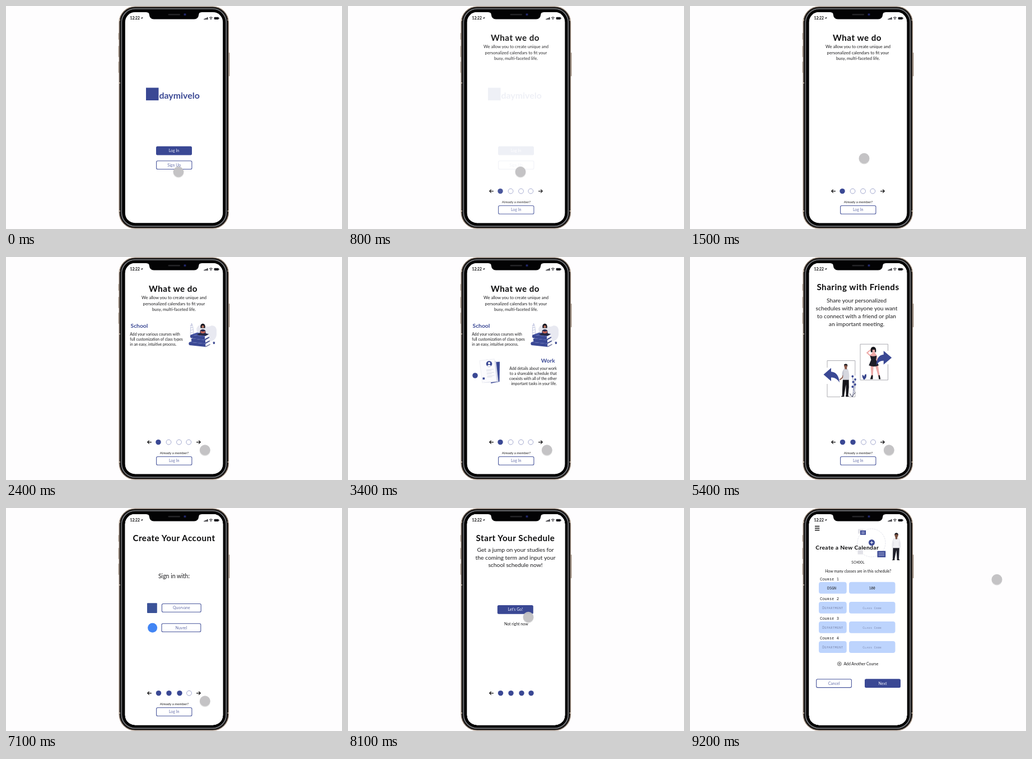
Animation of 600x397 px, one loop 9.3 s. Source, as an HTML page:

```html
<!DOCTYPE html>
<html lang="en">
<head>
<meta charset="utf-8">
<title>Calendar app onboarding</title>
<style>
html, body { margin: 0; width: 100%; height: 100%; overflow: hidden; background: #fefdfe; }
svg { display: block; width: 100vw; height: 100vh; }
text { font-family: Lato, "Open Sans", sans-serif; fill: #1c1c1e; }
.b { font-weight: 700; fill: #0b0b0c; }
.title { letter-spacing: .035em; }
.mono { font-family: "Noto Sans Mono", "DejaVu Sans Mono", monospace; }
.caps { font-variant: small-caps; }
</style>
</head>
<body>
<svg id="stage" viewBox="0 0 600 397" xmlns="http://www.w3.org/2000/svg"></svg>
<script>
const LOOP = 9300;
const BLUE = '#3a4894', INK = '#15151b', PALE = '#e8e9f1', FIELD = '#bdd4fd', SKIN = '#eeaaa8', BROWN = '#8b5a4c';

const text = (x, y, s, size, attr = '', anchor = 'middle') =>
  `<text x="${x}" y="${y}" font-size="${size}" text-anchor="${anchor}" ${attr}>${s}</text>`;
const lines = (x, y, step, list, size, anchor) =>
  list.map((s, i) => text(x, y + i * step, s, size, '', anchor)).join('');
const title = (s, x = 300, y = 58.5) => text(x, y, s, 15.1, 'class="b title"');
const label = (x, y, s, size, anchor) => text(x, y, s, size, `font-weight="700" style="fill:${BLUE}"`, anchor);
const rect = (x, y, w, h, fill, r = 0, attr = '') =>
  `<rect x="${x}" y="${y}" width="${w}" height="${h}" rx="${r}" fill="${fill}" ${attr}/>`;
const dot = (x, y, r, fill, attr = '') => `<circle cx="${x}" cy="${y}" r="${r}" fill="${fill}" ${attr}/>`;
const path = (d, fill, attr = '') => `<path d="${d}" fill="${fill}" ${attr}/>`;
const line = (d, color, w = 1, attr = '') => path(d, 'none', `stroke="${color}" stroke-width="${w}" ${attr}`);
const group = (id, body) => `<g id="${id}">${body}</g>`;

function button(x, y, w, s, solid) {
  const box = solid
    ? rect(x, y, w, 15.8, BLUE, 2.5)
    : rect(x + .6, y + .5, w - 1.2, 14.8, '#fff', 2.3, 'stroke="#4a579d" stroke-width="1.1"');
  return box + text(x + w / 2, y + 10.3, s, 7, `style="fill:${solid ? '#eef0fa' : '#6670aa'}"`);
}

function pager(count, xs = [272.5, 291, 310, 327], next = true) {
  const arrow = (x, d) => line(`M${x - 3.7 * d} 329.6H${x + 3.2 * d}M${x + .4 * d} 326.6L${x + 3.5 * d} 329.6L${x + .4 * d} 332.6`, '#101012', 1.3);
  return arrow(256.2, -1) + (next ? arrow(343.7, 1) : '') +
    xs.map((x, i) => i < count ? dot(x, 329.6, 4.7, BLUE)
      : dot(x, 329.6, 4.4, '#fff', 'stroke="#8890c0" stroke-width=".8"')).join('');
}

const member = () => text(300.5, 350.7, 'Already a member?', 6.1) + button(268, 355, 64.5, 'Log In');
const screen = (id, body) => group(id, rect(212, 10, 176, 377, '#fff') + body);

function phone() {
  const keys = [[200.7, 48, 12], [200.7, 71, 20], [200.7, 99, 20], [397.6, 83, 42]];
  return keys.map(([x, y, h]) => rect(x, y, 1.7, h, '#8d7d70', .7)).join('') +
    rect(201.4, .4, 196.8, 396.2, '#b3a091', 29) +
    rect(202.5, 1.4, 194.6, 394.2, '#39332f', 28) +
    rect(203.8, 2.5, 192, 392, '#0a0a0b', 26.8) +
    rect(206.4, 4.9, 186.8, 387.2, 'none', 24.2, 'stroke="#737477" stroke-width="1.9"') +
    rect(207.6, 6, 184.4, 385, '#020203', 23) +
    line('M201.4 25H204M395.5 25H398M201.4 137H204M395.5 365H398M201.4 365H204', '#d8cabc', 1.4);
}

function status() {
  return path('M251 10H349V11.2Q344.5 11.2 344.3 15Q343.4 23.6 336 23.6H264Q256.6 23.6 255.7 15Q255.5 11.2 251 11.2Z', '#030304') +
    rect(289.5, 14, 21.5, 2.4, '#242427', 1.2) + dot(319.5, 15.2, 2.4, '#15183f') + dot(319.5, 15.2, 1.1, '#2d348c') +
    text(221.6, 24, '12:22', 6.7, 'class="b"', 'start') +
    path('M240.8 21.5L244.6 19.6L242.8 23.6L242.4 21.9Z', INK) +
    [0, 1, 2, 3].map(i => rect(353.4 + i * 1.9, 22.7 - i * .9, 1.4, 1.5 + i * .9, INK, .3)).join('') +
    line('M363 20.8Q365.9 18.5 368.8 20.8M364.2 22.3Q365.9 21 367.6 22.3', INK, 1) + dot(365.9, 23.6, .8, INK) +
    rect(371.6, 19.7, 8.2, 4.2, INK, 1.1) + rect(380.2, 20.9, .8, 1.8, INK, .3);
}

function reader() {
  const book = (x, y, w) =>
    path(`M${x} ${y}L${x + 11} ${y - 4}L${x + w} ${y - 1.5}L${x + w - 8} ${y + 3}Z`, '#4453a3') +
    path(`M${x} ${y}L${x + w - 8} ${y + 3}V${y + 8.5}L${x} ${y + 5.5}Q${x - 2.5} ${y + 2.5} ${x} ${y}Z`, BLUE) +
    path(`M${x + w - 8} ${y + 3}L${x + w} ${y - 1.5}V${y + 3.5}L${x + w - 8} ${y + 7.7}Z`, '#f2f2f7') +
    line(`M${x + w - 8} ${y + 8.3}L${x + w} ${y + 4}`, '#29336f', 1);
  const rungs = [0, 1, 2, 3, 4, 5, 6].map(i => `M${328.6 + i * .4} ${122 + i * 4.2}l4.6 -.8`).join('');
  return path('M340 128Q344 118 354 122Q361 126 367 122Q377 122 376 134Q377 147 366 150Q352 154 344 146Z', PALE) +
    line('M333.5 152Q326 138 331.5 118Q337 130 333.5 152', '#9aa1cb', .6) + line(rungs, '#a9afd4', .7) +
    book(327.5, 151.5, 37) + book(332, 145, 32) + book(330, 138.5, 33) +
    path('M346 137L346.8 130.5Q351.5 127 356 130.5L357 137Z', '#262a50') +
    path('M347.4 126.5Q346.4 119 351.4 118.5Q356.5 119 355.6 126.5Z', '#17171f') + dot(351.5, 124, 2.2, '#b97463') +
    path('M347.5 131.5L351.5 132.8L355.7 131.5V135L351.5 136.3L347.5 135Z', '#c46458') +
    path('M341 137.5Q346.5 134.5 351 137Q356.5 134.5 361.5 137.8L357 140L345 139.5Z', '#242741') +
    path('M370.3 155Q368.8 151.5 370.5 150.3Q371.4 153 372.9 150.3Q373.6 153 372.4 155Z', '#3f4c93');
}

function resume() {
  return path('M261 187L271 186.6L270.5 222L255 225Z', BLUE) +
    path('M247 182.5L264.3 185L268.7 222L243 224Z', '#d4d7e8') +
    path('M235 184.6L261.3 181.6L265.6 221L239.8 224Z', '#fbfbfd', 'stroke="#e3e4ed" stroke-width=".6"') +
    dot(252, 190.3, 5.3, BLUE) + dot(252, 189, 2, '#fff') + path('M248.4 194Q252 190 255.6 194Q252 196.6 248.4 194Z', '#fff') +
    [0, 1, 2].map(i => line(`M${247 + i * .7} ${201 + i * 5.5}l13 -1.2M${247 + i * .7} ${203 + i * 5.5}l9 -.9`, '#cfd1df', .7)).join('') +
    rect(240.5, 214.5, 3.6, 3.6, BLUE) + dot(227, 211, 4.8, BLUE);
}

function sharing() {
  const frame = d => line(d, '#a3a3aa', .9);
  return frame('M245 197V184.5H294.8V211M245 226V249H268M284 249H294.8V238') +
    frame('M353.5 167V155.2H304V219H353.5V191') +
    // man
    path('M273 217H283.6Q284.6 232 282.4 246.5H278.6L278.4 227L275.2 246.5H271.8Q272 230 273 217Z', INK) +
    path('M269.8 248.7Q271 246 275.4 246V248.7ZM278.2 248.7V246H282L284 248.7Z', INK) +
    line('M273.5 209L272.5 214.5L267.3 218.7', BROWN, 2) +
    path('M274 200Q277.5 197.5 282 199.5Q285.3 208 283.8 218.7H273Z', '#d6d7df') +
    path('M274.5 200Q271.3 204 271.4 210.5L275 211.5Z', '#c5c7d2') +
    path('M276 194H280.5L280 200L276.3 199.4Z', BROWN) + dot(278, 194.2, 2.8, BROWN) +
    path('M275 193Q274.8 190.2 278.2 190.2Q281.8 190.3 281.2 194.5L279.5 192.4Z', INK) +
    path('M238.5 209.3L252 197.6V204.3Q265 204.5 267 223.5Q261 213.5 252 214.5V221Z', BLUE) +
    // flowers
    line('M290 249Q294 229 290 212M292 238L295.2 218M292 243Q296 233 294.6 227', '#4d5585', .6) +
    [[290.3, 212.5], [295, 218], [291.5, 222.5], [294.8, 227], [290.3, 231]].map(p => dot(...p, 1.9, BLUE)).join('') +
    line('M290 249Q286 246 285.5 243M290 249Q291 244 295.5 241.5', '#2c2f4c', 1) +
    // woman
    path('M322.3 191H328L326.5 213L324 214ZM330 191H335.5L339 213L336.7 214Z', SKIN) +
    path('M321.8 217.5L324 210.5H326.5V217.5ZM336.5 210.5H338.8L340.3 217.5H337.2Z', INK) +
    line('M322.3 176L316.3 170.5L323.5 164.5', SKIN, 2.1) + line('M333 176L334.5 187', SKIN, 2) +
    path('M325.8 165H330L329.8 170L333 174V177H322V174L325.6 171Z', SKIN) +
    path('M321.5 175.5Q327 178 333.3 175.5L332.3 183L337 193Q329 197 319.3 193L323.4 183Z', '#1d1d27') +
    path('M322.9 169.5Q321.3 160 327.4 159.8Q333.5 160.3 332.2 169.5L330.3 169.5L330 165H325.8V169.5Z', INK) +
    path('M360.2 179.2L345.7 167V173.8Q333.5 174.5 332.7 192.5Q338 183.7 345.7 184.8V191.4Z', BLUE) +
    path('M311 218.7Q306.5 214.5 308 209.5Q310 210.5 311 213Q312 208 314.5 208.5Q316.5 214.5 311 218.7Z', '#34428b');
}

function planner() {
  const card = (x, y, w, h) => rect(x, y, w, h, BLUE) +
    [.28, .5, .72].map(k => line(`M${x + 2} ${y + h * k}h${w - 4}`, '#c4cae9', .8)).join('');
  return dot(324, 62, 25, 'none', 'stroke="#dcdde6" stroke-width=".8" stroke-dasharray="3 1.2"') +
    rect(300, 37.5, 10, 8, '#e2e2e8') + card(304, 40, 10, 7.8) + rect(299.5, 75, 9.5, 7.5, '#e2e2e8') + card(334.5, 76.5, 14.7, 11.2) +
    dot(324.5, 61.5, 5.5, BLUE) + line('M321.7 61.5h5.6M324.5 58.7v5.6', '#fff', 1.1) +
    path('M362.5 69H374L373 91.5H369.7L368.5 75L365.2 91.5H362Z', '#20202a') +
    path('M360.5 93Q362 90.7 365.3 91V93ZM369.7 93V91H373L374.8 93Z', INK) +
    path('M364 54.5Q368.5 52.5 373 54.5Q376.5 61 375.5 70L373.5 71H363L361 70Q360.5 60 364 54.5Z', '#f0f0f4', 'stroke="#d3d3dc" stroke-width=".6"') +
    line('M363.7 60L363 68M373.3 60L373.7 68', '#cfcfd9', .6) + path('M366.4 49H370.6L370 55.4H367Z', '#78503f') +
    dot(368.6, 48.7, 3.1, '#78503f') + path('M365.3 48.5Q365 44.4 368.7 44.3Q372.2 44.5 371.9 48.5L370.5 46.8H367Z', INK);
}

function courses() {
  const grey = 'class="mono caps" style="fill:#7d8ab2"', dark = 'class="mono"';
  return [0, 1, 2, 3].map(i => {
    const y = 131.8 + i * 35.1;
    const hint = text(254.8, y + 12.6, 'Department', 6.2, grey) + text(325.2, y + 12.6, 'Class Code', 5.7, grey);
    return text(232, y - 2.8, 'Course ' + (i + 1), 7.1, 'class="mono caps"', 'start') +
      rect(230, y, 49.7, 20.8, FIELD, 4) + rect(284, y, 82.5, 20.8, FIELD, 4) +
      (i ? hint : group('hint', hint) + group('entry', text(253, y + 12.9, 'DSGN', 6.7, dark) + text(325.2, y + 12.9, '100', 6.2, dark)));
  }).join('');
}

const splash = screen('splash',
  rect(250, 145.5, 22.5, 22.5, BLUE) + label(273.5, 165.2, 'daymivelo', 15.9, 'start') +
  button(268, 249.8, 64, 'Log In', true) + button(268, 275.2, 64.5, 'Sign Up'));

const welcome = screen('welcome',
  title('What we do', 298.5, 61.9) +
  lines(300, 75.2, 10.5, ['We allow you to create unique and', 'personalized calendars to fit your', 'busy, multi-faceted life.'], 7.65) +
  group('school', label(222.5, 126.2, 'School', 10.3, 'start') +
    lines(221.3, 139.6, 9.1, ['Add your various courses with', 'full customization of class types', 'in an easy, intuitive process.'], 6.8, 'start') + reader()) +
  group('work', label(369.5, 188, 'Work', 10, 'end') +
    lines(372.8, 200.6, 9.2, ['Add details about your work', 'to a shareable schedule that', 'coexists with all of the other', 'important tasks in your life.'], 6.85, 'end') + resume()) +
  pager(1, [272, 290.5, 309, 326.3]) + member());

const friends = screen('friends',
  title('Sharing with Friends') +
  lines(297.5, 81.1, 13.8, ['Share your personalized', 'schedules with anyone you want', 'to connect with a friend or plan', 'an important meeting.'], 10.25) +
  group('people', sharing()) + pager(2) + member());

const account = screen('account',
  title('Create Your Account') + text(300, 125.2, 'Sign in with:', 10.5) +
  rect(252, 169.2, 17.8, 17.8, '#3b5298', 1) + dot(261.6, 213.2, 8.5, '#4285f4') +
  button(277.8, 170, 71, 'Quorvane') + button(277.4, 205.2, 71, 'Nuvrel') + pager(3) + member());

const start = screen('start',
  title('Start Your Schedule', 299) +
  lines(299, 77.6, 13.9, ['Get a jump on your studies for', 'the coming term and input your', 'school schedule now!'], 10.35) +
  button(266.8, 173, 64, 'Let’s Go!', true) + text(300.3, 208.8, 'Not right now', 7) +
  pager(4, undefined, false));

const calendar = screen('calendar',
  line('M223 32.4H231.3M223 36H231.3M223 39.6H231.3', '#111', 1.5) + planner() +
  text(224.3, 73.6, 'Create a New Calendar', 10.3, 'class="b title"', 'start') +
  text(300, 99.3, 'SCHOOL', 6.7, 'class="mono"') +
  text(300.3, 115.2, 'How many classes are in this schedule?', 6.95) + courses() +
  dot(266.8, 277.4, 3.4, 'none', 'stroke="#222" stroke-width=".7"') + line('M264.9 277.4h3.8M266.8 275.5v3.8', '#222', .7) +
  text(274.4, 279.9, 'Add Another Course', 6.95, '', 'start') +
  button(225, 304.3, 64, 'Cancel') + button(312, 304.2, 64, 'Next', true));

const pointer = group('pointer',
  dot(0, 1.5, 9.6, '#000', 'opacity=".07"') + dot(0, .7, 9.5, '#000', 'opacity=".08"') +
  dot(0, 0, 9.3, '#c3c2c4', 'opacity=".95"'));

const stage = document.getElementById('stage');
stage.innerHTML = `<defs><clipPath id="glass">${rect(212.8, 11, 174.4, 375.2, '#fff', 17.5)}</clipPath></defs>` +
  phone() + `<g clip-path="url(#glass)">${splash + welcome + friends + account + start + calendar}</g>` +
  status() + pointer;

// id: start and end of its fade-in
const fades = {
  welcome: [100, 950], school: [1700, 2400], work: [2600, 3350],
  friends: [3600, 4300], people: [4750, 5400], account: [6000, 6800],
  start: [7100, 7900], calendar: [8100, 8600], entry: [8750, 8950]
};
// time, x, y
const route = [
  [0, 308, 295], [1050, 308, 295], [1500, 311, 271], [1700, 311, 271], [2400, 355.3, 343.5],
  [7150, 355.3, 343.5], [7900, 322, 194], [8700, 322, 194], [9200, 548, 127], [LOOP, 548, 127]
];
const el = id => document.getElementById(id);
const ease = k => { k = Math.min(1, Math.max(0, k)); return k * k * (3 - 2 * k); };

function draw(t) {
  for (const [id, [a, b]] of Object.entries(fades)) el(id).setAttribute('opacity', ease((t - a) / (b - a)));
  el('hint').setAttribute('opacity', 1 - ease((t - fades.entry[0]) / 200));
  const i = Math.max(1, route.findIndex(p => p[0] > t));
  const [a, ax, ay] = route[i - 1], [b, bx, by] = route[i];
  const k = ease((t - a) / (b - a));
  el('pointer').setAttribute('transform', `translate(${ax + (bx - ax) * k} ${ay + (by - ay) * k})`);
}

const origin = performance.now();
function tick() {
  draw((performance.now() - origin) % LOOP);
  requestAnimationFrame(tick);
}
tick();
</script>
</body>
</html>
```
